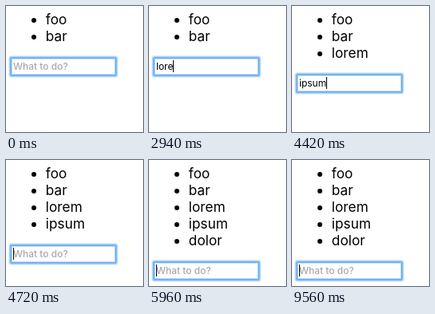
Animation of 172x158 px, one loop 10000 ms. Source, as an HTML page:

```html
<!DOCTYPE html>
<html lang="en">
<head>
<meta charset="utf-8">
<title>Todo list</title>
<style>
  html, body { margin: 0; width: 100%; height: 100%; overflow: hidden; background: #fff; }
  svg { display: block; width: 100%; height: 100%; }
  text { font-family: Inter, "Liberation Sans", sans-serif; white-space: pre; }
  .item { font-size: 17.3px; }
  .field { font-size: 12px; }
  .placeholder { fill: #a9a9a9; font-weight: 500; }
</style>
</head>
<body>
<svg viewBox="0 0 172 158">
  <g id="list"></g>
  <g id="input">
    <g id="ring"></g>
    <text id="value" class="field" x="9" y="80"></text>
    <rect id="caret" y="68" width="1" height="15"></rect>
  </g>
</svg>
<script>
const LOOP = 10000, BLINK = 600, ROW = 21, TEXT_X = 9;
const PLACEHOLDER = 'What to do?';

// Each step: time, items in the list, text in the field.
const steps = [
  [-780, 2, ''],
  [2560, 2, 'l'], [2740, 2, 'lo'], [2820, 2, 'lor'], [2900, 2, 'lore'], [2980, 2, 'lorem'],
  [3180, 3, ''],
  [3720, 3, 'i'], [3980, 3, 'ip'], [4080, 3, 'ips'], [4180, 3, 'ipsu'], [4420, 3, 'ipsum'],
  [4680, 4, ''],
  [5140, 4, 'd'], [5440, 4, 'do'], [5620, 4, 'dol'], [5700, 4, 'dolo'], [5760, 4, 'dolor'],
  [5960, 5, '']
];

const byId = id => document.getElementById(id);
const list = byId('list'), input = byId('input'), value = byId('value'), caret = byId('caret');

function add(parent, tag, attrs, text = '') {
  const node = document.createElementNS('http://www.w3.org/2000/svg', tag);
  for (const key in attrs) node.setAttribute(key, attrs[key]);
  node.textContent = text;
  return parent.appendChild(node);
}

const items = ['foo', 'bar', 'lorem', 'ipsum', 'dolor'].map((word, i) => {
  const item = add(list, 'g', { transform: `translate(0 ${i * ROW})` });
  add(item, 'circle', { cx: 35, cy: 18, r: 3 });
  add(item, 'text', { class: 'item', x: 49.8, y: 23 }, word);
  return item;
});

// Focus ring: nested rounded boxes from the outer glow to the white inside.
[[3, '#deedfd'], [2, '#acd3fb'], [1, '#7ab7f6'], [0, '#70afef'], [-1, '#c8dff8'], [-2, '#ffffff']].forEach(([grow, fill]) =>
  add(byId('ring'), 'rect', {
    x: 6 - grow, y: 65 - grow, width: 132 + 2 * grow, height: 22 + 2 * grow,
    rx: Math.max(0, grow + 1), fill
  }));

let shown;

function draw(time) {
  const step = steps.filter(s => s[0] <= time).pop();
  const [start, count, typed] = step;
  if (step !== shown) {
    shown = step;
    items.forEach((item, i) => item.setAttribute('visibility', i < count ? 'visible' : 'hidden'));
    input.setAttribute('transform', `translate(0 ${(count - 2) * ROW})`);
    value.textContent = typed || PLACEHOLDER;
    value.classList.toggle('placeholder', !typed);
    caret.setAttribute('x', TEXT_X + (typed ? Math.floor(value.getComputedTextLength()) : 0));
  }
  const on = Math.floor((time - start) / BLINK) % 2 === 0;
  caret.setAttribute('visibility', on ? 'visible' : 'hidden');
}

const origin = performance.now();
function tick() {
  draw((performance.now() - origin) % LOOP);
  requestAnimationFrame(tick);
}
tick();
</script>
</body>
</html>
```
